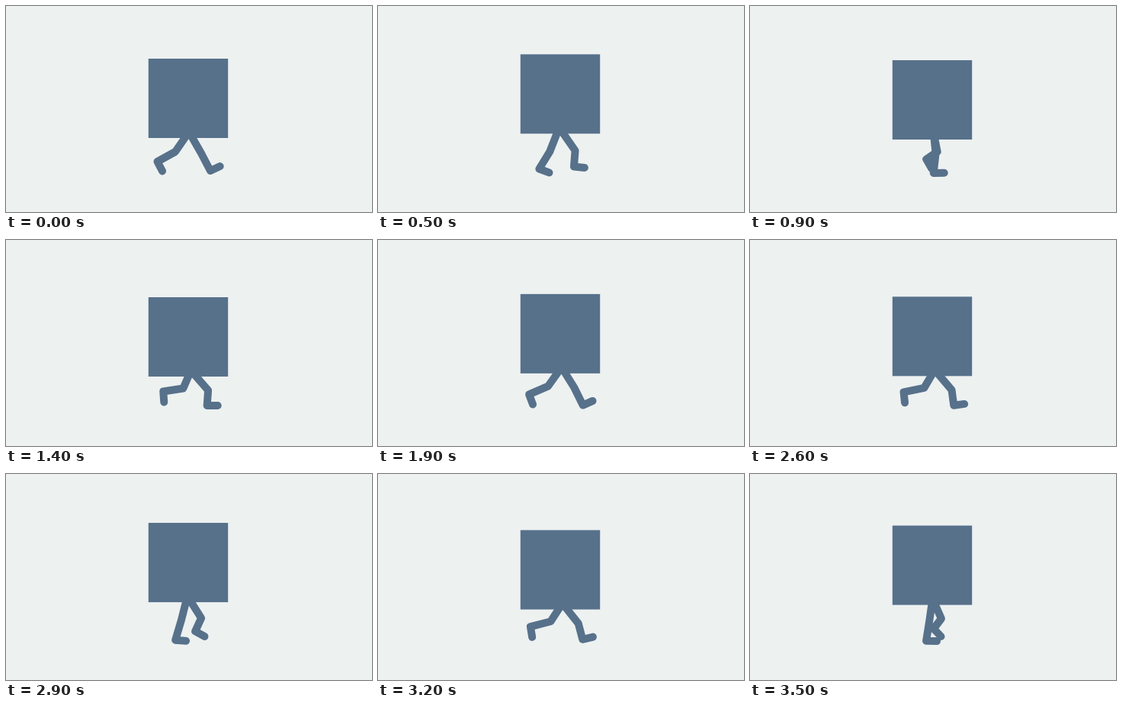
These frames come from a looping animation (480x270 px, 3600 ms). An HTML page:

```html
<!DOCTYPE html>
<html lang="en">
<head>
<meta charset="utf-8">
<title>Walking square</title>
<style>
  html, body { margin: 0; width: 100%; height: 100%; overflow: hidden; background: #edf1f0; }
  svg { display: block; width: 100vw; height: 100vh; }
  rect { fill: #57718b; }
  polyline { fill: none; stroke: #57718b; stroke-width: 10; stroke-linecap: round; stroke-linejoin: round; }
</style>
</head>
<body>
<svg viewBox="0 0 480 270">
  <polyline/>
  <polyline/>
  <rect x="186.8" y="69" width="104.4" height="104"/>
</svg>
<script>
const LOOP = 3600, TICK = 100, LAST = 3450;
const STEP = 623, FOOT = 14;

// Key poses evenly spaced over one stride: knee x, y, ankle x, y, foot tilt in degrees.
const poses = [
  [256, 193, 268, 216, -25],     // heel strike
  [265, 197, 263.5, 217, 0],     // weight taken
  [238, 192, 234.5, 219, 0],     // standing
  [227, 191, 215.5, 215.5, 12],  // heel lifts
  [222, 191, 198.5, 204, 62],    // push off
  [232.5, 194.5, 206.5, 198.5, 86],
  [249, 190, 237.5, 202, 51],    // swing through
  [258.5, 189, 253.5, 209, 15]   // reach
];

// Smooth closed curve through the poses; u counts strides.
function poseAt(u) {
  const n = poses.length, place = (u % 1) * n;
  const i = Math.floor(place), s = place - i;
  const [a, b, c, d] = [i - 1, i, i + 1, i + 2].map(k => poses[(k + n) % n]);
  return b.map((p, k) => p + s / 2 * (c[k] - a[k]
    + s * (2 * a[k] - 5 * p + 4 * c[k] - d[k]
    + s * (3 * (p - c[k]) + d[k] - a[k]))));
}

function legPoints(hip, u) {
  const [kx, ky, ax, ay, tilt] = poseAt(u);
  const r = tilt * Math.PI / 180;
  return [...hip, kx, ky, ax, ay, ax + FOOT * Math.cos(r), ay + FOOT * Math.sin(r)];
}

const body = document.querySelector("rect");
const legs = document.querySelectorAll("polyline");
const start = performance.now();

function draw() {
  const elapsed = Math.max(0, performance.now() - start) % LOOP;
  const steps = Math.min(Math.floor(elapsed / TICK) * TICK, LAST) / STEP;
  const bob = Math.sin(2 * Math.PI * steps);
  const top = 69 + 6 * bob;
  const hip = [240 + 2.5 * bob, top + 96];
  body.setAttribute("y", top);
  legs.forEach((leg, i) =>
    leg.setAttribute("points", legPoints(hip, (steps + i) / 2).join(" ")));
  requestAnimationFrame(draw);
}
draw();
</script>
</body>
</html>
```
